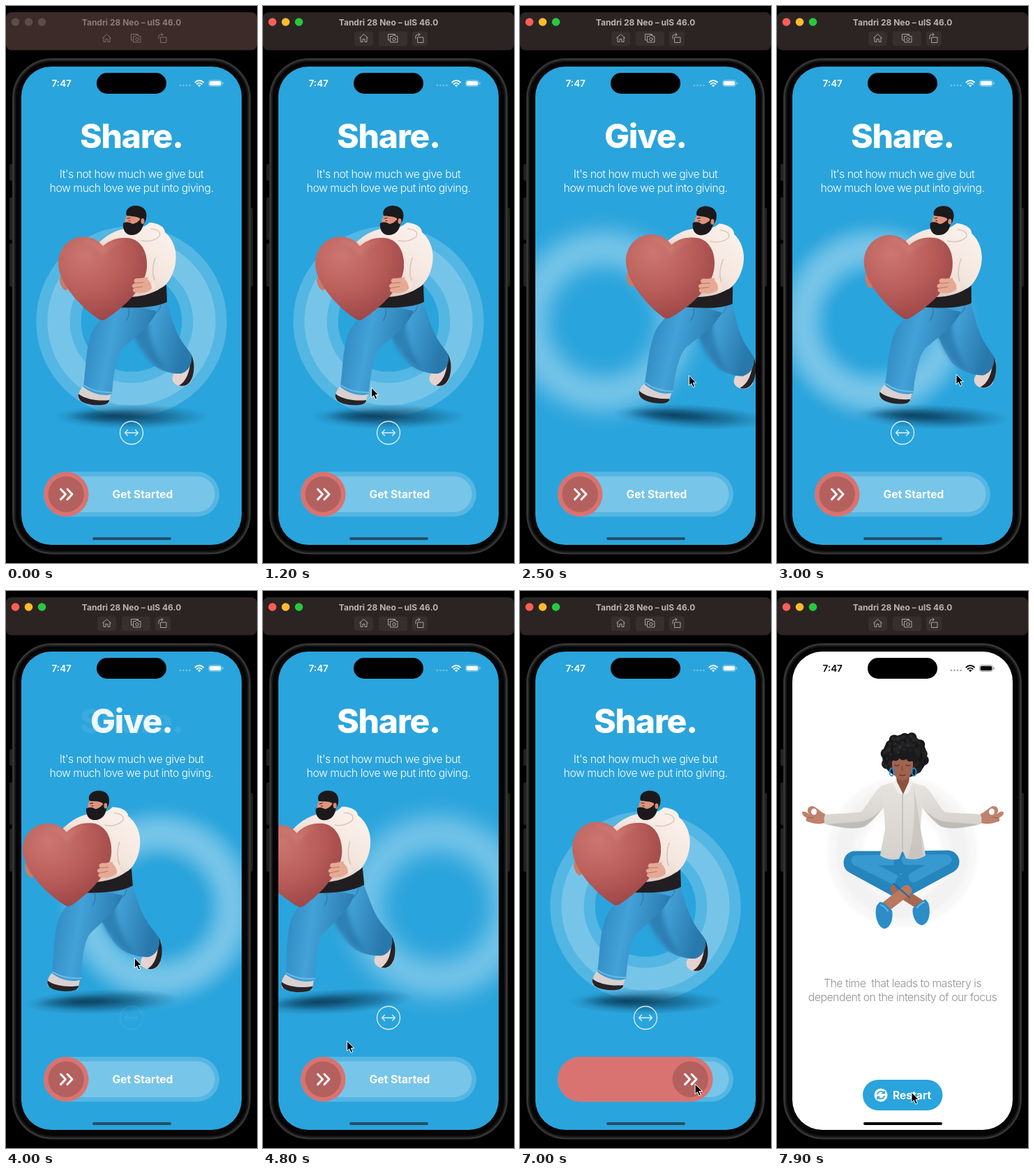
Write an HTML page that moves like this. It is 360 px wide and 800 px high and loops after 8 s.

```html
<!DOCTYPE html>
<html lang="en">
<head>
<meta charset="utf-8">
<title>Share and give</title>
<style>
html, body { margin: 0; width: 100%; height: 100%; overflow: hidden; background: #000; }
svg { display: block; width: 100vw; height: 100vh; font-family: Inter, Roboto, sans-serif; }
text { white-space: pre; }
.mid { text-anchor: middle; }
.title { font-size: 48px; font-weight: 800; letter-spacing: -1.2px; fill: #fff; }
.body { font-size: 15.8px; font-weight: 300; letter-spacing: -.48px; }
.label { font-size: 15.6px; font-weight: 700; fill: #fff; }
.line { fill: none; stroke-linecap: round; stroke-linejoin: round; }
.soft { filter: blur(3px); }
</style>
</head>
<body>
<svg viewBox="0 0 360 800">
<defs>
  <clipPath id="screen"><rect x="22" y="87" width="316" height="687" rx="43"/></clipPath>
  <radialGradient id="heart" cx=".3" cy=".22" r=".85">
    <stop offset="0" stop-color="#cb7770"/><stop offset=".5" stop-color="#bb5f5b"/><stop offset="1" stop-color="#9a4546"/>
  </radialGradient>
  <linearGradient id="wool" x1="1" y1="0" x2=".2" y2="1">
    <stop offset="0" stop-color="#fdf5f0"/><stop offset=".55" stop-color="#f4e6de"/><stop offset="1" stop-color="#d3bcb3"/>
  </linearGradient>
  <linearGradient id="jeans" x1="0" y1="0" x2="1" y2=".25">
    <stop offset="0" stop-color="#2a81ba"/><stop offset=".45" stop-color="#43a2d8"/><stop offset="1" stop-color="#2878ac"/>
  </linearGradient>
  <linearGradient id="shirt" x1="0" y1="0" x2="0" y2="1">
    <stop offset="0" stop-color="#e6e3de"/><stop offset="1" stop-color="#d4d0cb"/>
  </linearGradient>
  <radialGradient id="shade">
    <stop offset="0" stop-color="#0b3f5d" stop-opacity=".85"/><stop offset=".5" stop-color="#0e4a6c" stop-opacity=".5"/>
    <stop offset="1" stop-color="#14608a" stop-opacity="0"/>
  </radialGradient>
  <g id="rings" fill="none" stroke-opacity=".2">
    <circle r="104.5" stroke-width="32.2"/><circle r="104.5" stroke-width="64.4"/>
  </g>
</defs>

<!-- window bar -->
<rect id="bar" y="9" width="360" height="54.5" rx="8"/>
<g id="pads" fill="#372f2e">
  <rect x="131" y="36.5" width="27" height="21" rx="4"/><rect x="166" y="36.5" width="41" height="21" rx="4"/><rect x="214" y="36.5" width="22" height="21" rx="4"/>
</g>
<g id="lights"><circle cx="13.5" cy="23" r="5.8"/><circle cx="32.5" cy="23" r="5.8"/><circle cx="51.5" cy="23" r="5.8"/></g>
<text id="device" class="mid" x="180" y="27.5" font-size="12" font-weight="700">Tandri 28 Neo – ulS 46.0</text>
<g id="tools" class="line">
  <path d="M138.500 46l6-5.500 6 5.500M140 45v6.500h3v-4h3v4h3V45"/>
  <path d="M181.500 49h-2v-8.500h10v2M183 43.500h2.500l1-1.500h3l1 1.500h2.500v8.500h-10z"/><circle cx="188" cy="47.700" r="2.200"/>
  <path d="M222 45h8v7.500h-8zM219 47v-3q0-3 3-3h3M223 39l2.200 2-2.200 2"/>
</g>

<!-- phone body -->
<g fill="#222">
  <rect x="5" y="227" width="6" height="24" rx="2"/><rect x="5" y="275" width="6" height="61" rx="2"/>
  <rect x="5" y="341" width="6" height="62" rx="2"/><rect x="349" y="290" width="5" height="113" rx="2"/>
</g>
<rect x="10.500" y="76.500" width="339" height="709.500" rx="56" fill="#050505" stroke="#343434" stroke-width="3"/>
<rect x="13" y="79" width="334" height="704.500" rx="53" fill="none" stroke="#171717" stroke-width="2"/>

<g clip-path="url(#screen)">
  <rect id="paper" x="22" y="87" width="316" height="687"/>

  <g id="intro">
    <text id="share" class="title mid" x="180" y="204">Share.</text>
    <text id="give" class="title mid" x="180" y="204">Give.</text>
    <g class="body mid" fill="#fff">
      <text x="180" y="247">It's not how much we give but</text>
      <text x="180" y="267">how much love we put into giving.</text>
    </g>
    <use id="halo" href="#rings" stroke="#fff"/>

    <g id="runner">
      <ellipse cx="180" cy="590" rx="112" ry="18" fill="url(#shade)"/>
      <ellipse cx="152" cy="589" rx="66" ry="10" fill="url(#shade)"/>
      <!-- back leg -->
      <path d="M244 524C236 532 237 541 246 545C254 548 262 545 266 538L269 506Z" fill="#e6d3d0"/>
      <path d="M265 500C271 508 271 528 265 538C261 545 254 547 248 545C259 539 265 524 265 500Z" fill="#272226"/>
      <path d="M168 425H230C236 440 240 462 250 478C256 488 262 494 266 501C268 513 262 525 251 528C234 529 212 520 204 509C192 492 188 478 182 470Z" fill="url(#jeans)"/>
      <path class="soft" d="M180 462C190 490 200 510 228 522C214 500 206 478 204 452Z" fill="#1f689b" opacity=".55"/>
      <!-- front leg -->
      <path d="M112 545C105 551 103 558 104 565C118 571 136 573 147 571L151 555Z" fill="#d9d0d0"/>
      <path d="M104 557C102 566 110 571 125 573C141 574 148 572 148 566C134 568 113 565 104 557Z" fill="#282326"/>
      <path d="M165 428L216 438C207 462 181 478 167 492C158 503 154 530 152 557C139 562 122 556 111 547C114 524 114 500 120 478C124 462 134 450 150 438Z" fill="url(#jeans)"/>
      <path class="line" d="M112 545Q128 556 152 555" stroke="#6bbbe6" stroke-width="2"/>
      <path class="line" d="M222 430Q220 441 208 445M176 434Q178 445 172 452" stroke="#2873a5" stroke-width="1"/>
      <path d="M166 417C190 416 215 412 230 400L231 425C215 433 190 434 163 433Z" fill="#211e21"/>
      <!-- top -->
      <path d="M133 340C148 326 160 322 170 320C184 322 196 320 206 311C220 312 228 318 228 325C240 335 246 352 243 370C240 388 230 402 222 405C210 414 190 418 176 418C160 400 150 370 133 340Z" fill="url(#wool)"/>
      <path class="line" d="M208 320Q224 322 220 331Q210 340 194 337M214 362Q208 380 213 394" stroke="#cdb4aa" stroke-width="1.500" opacity=".7"/>
      <!-- head -->
      <path d="M174 297L194 300L198 312L190 321L171 317C172 309 169 308 172 304Z" fill="#dd947c"/>
      <path d="M168 312C174 309 178 311 181 313C186 313 190 309 193 306L197 312C196 322 190 329 180 329C172 329 167 322 168 312Z" fill="#1b191c"/>
      <path d="M173 301C170 291 180 286 188 287C200 288 204 298 200 309L195 317L192 305C186 301 179 303 173 301Z" fill="#1b191c"/>
      <ellipse cx="196" cy="309" rx="2.500" ry="4" fill="#d38b73"/>
      <path class="line" d="M174 305l4-.5M176 308.500h2" stroke="#4a2a24" stroke-width="1.200"/>
      <!-- heart and hands -->
      <ellipse cx="83" cy="398" rx="5" ry="11" transform="rotate(-20 83 398)" fill="#c67c6c"/>
      <path d="M139 345C130 333 116 330 104 332C86 336 74 352 75 372C77 402 112 436 132 449C136 452 140 452 144 449C168 434 200 404 202 376C204 352 192 333 172 333C158 332 146 338 139 345Z" fill="url(#heart)"/>
      <path class="soft" d="M139 347C133 337 118 334 106 338C120 340 133 345 139 362C144 348 160 338 174 338C160 335 146 338 139 347Z" fill="#d98b80" opacity=".4"/>
      <path d="M208 391C200 388 194 392 189 391C183 391 182 396 186 398C180 399 179 404 184 405C180 407 182 412 188 412C198 413 206 410 211 404Z" fill="#e6a993"/>
      <path class="line" d="M186 398L197 397M184 405L196 403" stroke="#b97566" stroke-width="1"/>
      <path d="M205 388Q214 392 215 406L209 409Q210 398 203 392Z" fill="#f3e3da"/>
    </g>

    <g id="arrows" class="line" stroke="#fff" stroke-width="1.300" opacity=".85">
      <circle cx="180" cy="613" r="16.500"/>
      <path d="M170.500 613h19M174.500 609l-4 4 4 4M185.500 609l4 4-4 4"/>
    </g>

    <rect x="54" y="669" width="252" height="64.500" rx="32.200" fill="#fff" opacity=".2"/>
    <rect x="60.500" y="675.500" width="239" height="51.500" rx="25.700" fill="#fff" opacity=".2"/>
    <text class="label mid" x="196" y="707">Get Started</text>
    <rect id="fill" x="54" y="669" height="64.500" rx="32.200" fill="#d87371"/>
    <g id="knob">
      <circle cx="86.200" cy="701.200" r="25.700" opacity=".17"/>
      <path class="line" d="M78.500 694l7 7.300-7 7.300M88 694l7 7.300-7 7.300" stroke="#fff" stroke-width="3"/>
    </g>
  </g>

  <g id="home">
    <use id="mist" href="#rings" stroke="#808080"/>
    <g id="hair"></g>
    <!-- arms -->
    <g id="arm">
      <path d="M70 321C60 316 56 309 50 309C43 309 42 318 47 321C43 318 38 315 36 318C36 323 41 325 43 326C40 328 42 332 47 332C54 335 63 335 69 333Z" fill="#bf826c"/>
      <ellipse cx="53" cy="317" rx="4" ry="4.500" fill="#fff"/>
      <path class="line" d="M43 326l9-1" stroke="#99604f" stroke-width="1"/>
      <path d="M152 279C141 284 132 305 121 317C108 320 88 319 69 321Q66 328 69 335C88 339 108 343 125 339C137 332 149 316 157 304Z" fill="url(#shirt)"/>
      <path d="M72 335C92 340 112 344 127 337Q140 327 152 312Q136 328 122 331Q98 333 72 335Z" fill="#a9a5a2" opacity=".5"/>
    </g>
    <use href="#arm" transform="matrix(-1 0 0 1 361 0)"/>
    <!-- legs -->
    <g class="line">
      <path d="M176 390L112 390L176 425" stroke="#2585bd" stroke-width="33"/>
      <path d="M174 386L114 387L168 414" stroke="#3899d0" stroke-width="15"/>
      <path d="M170 428L203 449" stroke="#a9674f" stroke-width="15"/>
      <path d="M184 390L245 389L186 421" stroke="#2585bd" stroke-width="33"/>
      <path d="M186 386L243 386L196 411" stroke="#3899d0" stroke-width="15"/>
      <path d="M186 430L158 452" stroke="#b9785f" stroke-width="15"/>
      <path d="M167 420L190 440" stroke="#1c6c9d" stroke-width="2"/>
    </g>
    <path d="M147 447C153 445 158 452 165 459C167 468 164 484 154 485C144 483 139 464 143 452Z" fill="#2c8dc7"/>
    <path d="M213 443C207 444 202 451 195 455C193 464 198 479 208 480C219 478 221 460 217 448Z" fill="#2c8dc7"/>
    <path d="M149 451q6 2 10 9M211 447q-6 2-10 8" class="line" stroke="#6cb5dd" stroke-width="2"/>
    <!-- torso -->
    <path d="M150 280C160 276 168 275 172 274H189C198 276 204 278 212 281C210 302 206 322 206 342C209 357 212 368 213 380Q200 388 185 384L180 373L175 385Q160 388 148 380C150 366 153 355 155 342C155 322 151 302 150 280Z" fill="url(#shirt)"/>
    <path d="M196 282Q206 330 209 380Q200 386 188 384Q200 340 196 282Z" fill="#b3aeaa" opacity=".4"/>
    <path class="line" d="M180 292V372" stroke="#b7b2ad" stroke-width="1.200"/>
    <path d="M171 264H190L189 279L181 293L172 279Z" fill="#8d5141"/>
    <path d="M166 274L171 272L181 292L174 291ZM195 274L190 272L181 292L188 291Z" fill="#f1efeb"/>
    <!-- face -->
    <path d="M165 246C167 236 193 236 195 246C196 260 190 271 180 272C170 271 164 260 165 246Z" fill="#a06350"/>
    <path class="line" d="M169 250q3 2 6 0M185 250q3 2 6 0M176 264q4 2 8 0" stroke="#482a25" stroke-width="1.200"/>
    <path class="line" d="M180 251l-1.500 6h3" stroke="#804836" stroke-width="1"/>
    <g fill="#1b1b1c"><circle cx="170" cy="238" r="6"/><circle cx="181" cy="236" r="7"/><circle cx="191" cy="239" r="6"/></g>
    <g class="line" stroke="#2790ca" stroke-width="2"><ellipse cx="164.500" cy="260" rx="3" ry="5.500"/><ellipse cx="196.500" cy="260" rx="3" ry="5.500"/></g>

    <g class="body mid" fill="#929296">
      <text x="180" y="569">The time  that leads to mastery is</text>
      <text x="180" y="589">dependent on the intensity of our focus</text>
    </g>
    <rect x="123" y="702" width="114.500" height="44" rx="22" fill="#2aa4dc"/>
    <circle cx="149" cy="724" r="9.500" fill="#fff"/>
    <path class="line" d="M144 722.500a5.300 5.300 0 0 1 9.500-1.500M154 725.500a5.300 5.300 0 0 1-9.500 1.500M154 718.500v3h-3M144 729.500v-3h3" stroke="#2aa4dc" stroke-width="1.700"/>
    <text class="label" x="166" y="729.500">Restart</text>
  </g>

  <!-- status bar -->
  <rect x="130" y="96" width="100" height="30" rx="15"/>
  <g id="status" fill="currentColor">
    <text x="65.500" y="116" font-size="13.500" font-weight="600">7:47</text>
    <g opacity=".35"><circle cx="250" cy="114" r="1.300"/><circle cx="254.500" cy="114" r="1.300"/><circle cx="259" cy="114" r="1.300"/><circle cx="263.500" cy="114" r="1.300"/></g>
    <path d="M271.500 109.500a8 8 0 0 1 11.500 0M273.800 112a5 5 0 0 1 6.900 0" class="line" stroke="currentColor" stroke-width="1.900"/>
    <path d="M275 114l2.250 2.300 2.250-2.300a3.300 3.300 0 0 0-4.500 0z"/>
    <rect x="290.500" y="106.500" width="19" height="9" rx="3" fill="none" stroke="currentColor" stroke-width=".8" opacity=".45"/>
    <rect x="291.700" y="107.700" width="16.600" height="6.600" rx="2"/><rect x="310.500" y="109.500" width="1.200" height="3" opacity=".5"/>
  </g>
  <rect id="grip" x="124" y="763" width="113" height="4" rx="2"/>
</g>

<path id="cursor" d="M0 0V14.500L3.300 11.500L5.700 17L8.300 15.900L5.900 10.500H10.300Z" stroke="#fff" stroke-width="1"/>
</svg>

<script>
const LOOP = 8000, FOCUS = 1000, SWITCH = 7500;
const $ = id => document.getElementById(id);
const set = (id, attrs) => { for (const k in attrs) $(id).setAttribute(k, attrs[k]); };
const show = (id, on) => { $(id).style.display = on ? '' : 'none'; };
const clamp = x => Math.min(1, Math.max(0, x));
const easeOut = x => 1 - (1 - clamp(x)) ** 1.66;

// Linear interpolation over [time, value] pairs
function key(t, pairs, col = 1) {
  if (t <= pairs[0][0]) return pairs[0][col];
  for (let i = 1; i < pairs.length; i++) {
    const a = pairs[i - 1], b = pairs[i];
    if (t < b[0]) return a[col] + (b[col] - a[col]) * (t - a[0]) / (b[0] - a[0]);
  }
  return pairs[pairs.length - 1][col];
}

// A drag that eases back to zero once let go
const pull = (t, pairs) => key(t, pairs) * (1 - easeOut((t - pairs[pairs.length - 1][0]) / 1000));

const right = [[1720, 0], [2000, 34], [2700, 71]];
const left = [[3750, 0], [4000, -40], [4500, -127]];
const slide = [[5500, 0], [5900, 34], [6500, 98], [7100, 170], [7300, 187.5]];
const pointer = [
  [1000, 152, 552], [1700, 164, 538], [2000, 193.5, 536], [2650, 257, 529], [3050, 257, 529],
  [3700, 240, 529], [4000, 184.5, 527], [4450, 128, 530], [4800, 120.5, 646], [5350, 93, 708],
  [5500, 93, 708], [5900, 127, 708], [6500, 191, 708], [7100, 263, 708], [7450, 235, 712], [7800, 193, 720]
];

// Curly hair: dark tufts on a golden-angle spiral
let tufts = '<ellipse cx="183" cy="237" rx="32" ry="31" fill="#151516"/>';
for (let i = 44; i > 0; i--) {
  const a = i * 2.4, d = Math.sqrt(i / 44);
  const x = 183 + 29 * d * Math.cos(a), y = 236 + 27 * d * Math.sin(a);
  tufts += `<circle cx="${x}" cy="${y}" r="7.5" fill="${['#171718', '#222224', '#1b1b1d'][i % 3]}"/>`
    + `<circle cx="${x - 1}" cy="${y - 2}" r="2.5" fill="#39393c" opacity=".5"/>`;
}
$('hair').innerHTML = tufts;

function draw(t) {
  const active = t >= FOCUS, home = t >= SWITCH;
  const ramp = start => clamp((t - start) / 250);

  set('bar', { fill: active ? '#2b2423' : '#3c2b28' });
  set('device', { fill: active ? '#b9b3b1' : '#8c7b77' });
  set('tools', { stroke: active ? '#aaa4a2' : '#806f6b' });
  show('pads', active);
  [...$('lights').children].forEach((c, i) =>
    c.setAttribute('fill', active ? ['#ff5f57', '#febc2e', '#28c840'][i] : '#5d4c48'));

  show('intro', !home);
  show('home', home);
  set('paper', { fill: home ? '#fff' : '#2aa4dc' });
  set('grip', { fill: home ? '#000' : '#234f68' });
  $('status').style.color = home ? '#000' : '#fff';

  const shift = t < 3720 ? pull(t, right) : pull(t, left);
  const give = ramp(1770) - ramp(2700) + ramp(3770) - ramp(4500);
  set('runner', { transform: `translate(${shift * 1.2}) rotate(${shift / 20} 180 450)` });
  set('halo', { transform: `translate(${180 - shift} 453)` });
  $('halo').style.filter = `blur(${Math.abs(shift) / 5}px)`;
  set('share', { opacity: 1 - give });
  set('give', { opacity: give });
  set('arrows', { opacity: .85 * (1 - give) });

  const knob = key(t, slide);
  set('fill', { width: 64.5 + knob });
  set('knob', { transform: `translate(${knob})` });

  const grow = easeOut((t - SWITCH) / 1000);
  set('mist', { transform: `translate(180 375) scale(${.5 + grow / 2})`, opacity: .5 * grow });
  $('mist').style.filter = `blur(${8 * (1 - grow)}px)`;

  show('cursor', active);
  set('cursor', { transform: `translate(${key(t, pointer)} ${key(t, pointer, 2)})` });
}

function tick(now) {
  draw(now % LOOP);
  requestAnimationFrame(tick);
}
draw(0);
requestAnimationFrame(tick);
</script>
</body>
</html>
```
